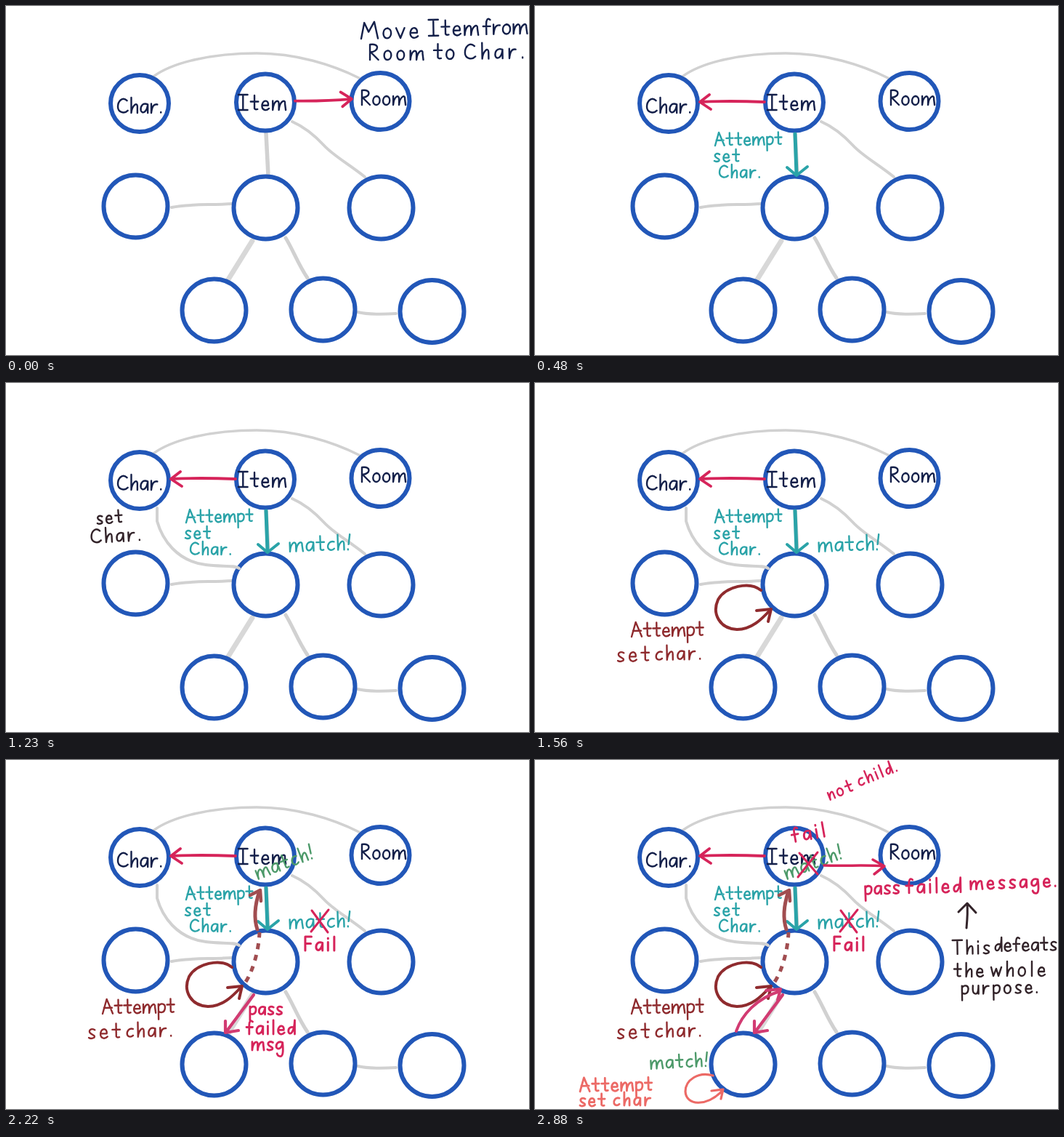
Recreate the animation shown at these times as an HTML page. Size 720x480 px, loop 3.79 s.

```html
<!DOCTYPE html>
<html lang="en">
<head>
<meta charset="utf-8">
<title>Message passing between nodes</title>
<style>
html, body { margin: 0; width: 100%; height: 100%; overflow: hidden; background: #fff; }
svg { display: block; width: 720px; height: 480px; }
path, ellipse { fill: none; stroke-linecap: round; stroke-linejoin: round; vector-effect: non-scaling-stroke; }
</style>
</head>
<body>
<svg id="stage" viewBox="0 0 720 480"></svg>
<script>
const LOOP = 3790, STEP = 80;
const NAVY = '#14204a', BLUE = '#2257b8', GRAY = '#d1d1d1', TEAL = '#2aa3a8', RED = '#d6245a',
      BROWN = '#8f2b2e', ROSE = '#a14d50', PINK = '#d23b72', GREEN = '#4d9a6a', DARK = '#33242a', CORAL = '#ec6a66';

// Pen strokes for each letter: width, path (cap top 0, baseline 20).
const pen = {
  a: [10, 'M10 9C3 6 0 12 1 17C3 22 9 19 10 9V20'],
  c: [9, 'M9 9C3 7 0 13 1 17C3 21 7 20 9 18'],
  d: [10, 'M10 11C4 8 0 12 1 17C3 22 9 19 10 0V20'],
  e: [10, 'M1 14H9C10 7 3 6 1 13C0 20 6 22 10 18'],
  f: [9, 'M9 2C6 -1 4 2 4 7V20M0 10H9'],
  g: [11, 'M10 9C3 6 0 12 1 16C3 20 9 18 10 9C11 20 11 29 7 29Q3 29 2 25'],
  h: [9, 'M1 0V20C2 10 9 5 9 12V20'],
  i: [3, 'M2 8V20M2 2V3'],
  l: [3, 'M2 0V20'],
  m: [18, 'M1 8V20C2 8 9 5 9 12V20C10 8 18 5 17 12L18 20'],
  n: [9, 'M1 8V20C2 10 9 5 9 12V20'],
  o: [10, 'M6 8C-1 8 -1 20 5 20S12 8 5 8'],
  p: [10, 'M1 8V29M1 11C4 6 11 7 10 14C9 21 3 20 1 18'],
  r: [9, 'M1 8V20C2 12 4 8 9 9'],
  s: [9, 'M9 9C4 6 0 10 3 13S10 16 8 19Q4 21 1 19'],
  t: [10, 'M5 1V18Q6 20 9 19M0 9H10'],
  u: [9, 'M1 8C0 18 2 20 5 20S9 14 9 8V20'],
  v: [10, 'M0 8L5 20L10 8'],
  w: [14, 'M0 8L3 20L7 10L10 20L14 8'],
  A: [14, 'M0 20L6 0L14 20M2 12H13'],
  C: [13, 'M12 4C6 -2 0 5 0 12S8 22 13 17'],
  F: [10, 'M1 20V0H10M1 10H9'],
  I: [12, 'M0 0H12M6 0V20M0 20H12'],
  M: [20, 'M0 20L4 1L9 12L16 0L20 20'],
  R: [12, 'M1 20V0C14 -2 13 9 2 10L12 20'],
  T: [14, 'M0 0H14M7 0V20'],
  '.': [2, 'M1 19V19.6'],
  '!': [4, 'M4 0L2 13M1 19.4V20']
};

const stage = document.getElementById('stage');
const layers = [];
let layer;

function add(parent, tag, attrs) {
  const el = document.createElementNS('http://www.w3.org/2000/svg', tag);
  for (const k in attrs) el.setAttribute(k, attrs[k]);
  return parent.appendChild(el);
}
function show(from, to = LOOP) {
  layer = add(stage, 'g', {});
  layers.push({ el: layer, from, to });
}
const line = (d, stroke, width = 4, extra) =>
  add(layer, 'path', { d, stroke, 'stroke-width': width, ...extra });

function write(word, x, y, size, gap, color, turn = 0, width = 2.4) {
  const g = add(layer, 'g', {
    role: 'img', 'aria-label': word,
    transform: `translate(${x} ${y}) rotate(${turn}) scale(${size})`
  });
  let left = 0;
  for (const ch of word) {
    const [w, d] = pen[ch];
    add(g, 'path', { d, stroke: color, 'stroke-width': width, transform: `translate(${left} -20)` });
    left += w + gap;
  }
}
const node = (cx, cy, rx, ry) =>
  add(layer, 'ellipse', { cx, cy, rx, ry, stroke: BLUE, 'stroke-width': 6 });

// The graph
show(0);
line('M203 97C230 77 285 65 345 65C400 65 450 81 486 99', GRAY, 3.5);
line('M358 175L361 233', GRAY, 5.5);
line('M394 159C410 166 425 178 438 192S470 216 494 235', GRAY);
line('M228 277C250 272 280 274 311 272', GRAY);
line('M339 323L306 376', '#d8d8d8', 7);
line('M385 319C395 335 402 355 415 374', GRAY, 5);
line('M484 421C500 425 520 424 537 423', GRAY);
for (const [x, y] of [[184, 134], [357, 132.5], [515.5, 131]]) node(x, y, 40, 39);
for (const [x, y] of [[178.5, 275.5], [357.5, 277.5], [516.5, 277.5], [286.5, 418.5], [436.5, 417.5], [586.5, 420]])
  node(x, y, 44, 43);
write('Char.', 154, 147, 1.05, 3.6, NAVY);
write('Item', 320, 143, 1.05, 4, NAVY);
write('Room', 489, 136, 1, 3.7, NAVY);
const arrow = line('', RED, 3.8);

show(0, 480);
write('Move', 489, 45, 1.15, 6, NAVY, -1);
write('Item', 582, 41, 1.1, 4, NAVY, -1);
write('from', 657, 39, 1.1, 3, NAVY, -1);
write('Room', 500, 74, 1.05, 7, NAVY);
write('to', 589, 73, 1.1, 5, NAVY);
write('Char.', 632, 73, 1.1, 7.5, NAVY, -1);

show(480);
line('M358 176L360 231', TEAL, 5);
line('M347 222L360 233L375 221', TEAL);
write('Attempt', 248, 192, 0.9, 3.3, TEAL, -1);
write('set', 246, 214, 0.9, 5, TEAL);
write('Char.', 254, 236, 0.9, 4.7, TEAL);

show(900);
write('match!', 390, 232, 1.05, 4, TEAL, -2);

show(1230);
line('M208 172V190C215 215 235 245 275 250C295 253 315 250 321 255', GRAY);

show(1230, 1560);
write('set', 125, 194, 0.9, 5, DARK, -4);
write('Char.', 118, 220, 1, 6, DARK, -3);

show(1560);
line('M311 285C295 272 262 280 252 298C243 318 255 338 278 339C298 339 312 325 324 312', BROWN);
line('M305 313L325 311L321 328', BROWN);
write('Attempt', 133, 349, 1, 2.8, BROWN, -1);
write('set', 113, 383, 1.05, 6.5, BROWN, -1);
write('char.', 166, 381, 1, 5.8, BROWN, -1);

show(1890);
line('M346 233C340 215 344 195 349 180', ROSE, 5);
line('M336 186L350 179L351 194', ROSE, 4.5);
line('M330 305C340 290 348 262 349 237', ROSE, 5, { 'stroke-dasharray': '8 8', style: 'stroke-linecap:butt' });
line('M421 207L443 237M444 206L420 236', RED, 3);
write('Fail', 411, 262, 0.95, 6, RED, 0, 3);

show(2220);
line('M341 323L303 374M302 359L302 375L320 372', PINK, 4.2);
write('match!', 347, 164, 1, 4.5, GREEN, -21);

show(2220, 2550);
write('pass', 335, 350, 0.9, 4, RED, 0, 2.8);
write('failed', 331, 377, 0.95, 5, RED, 0, 2.8);
write('msg', 338, 399, 0.95, 4, RED, 0, 2.8);

show(2550);
write('not', 406, 55, 0.85, 6, RED, -22);
write('child.', 447, 36, 0.85, 6, RED, -22);
write('fail', 355, 113, 1, 6.7, RED, -10, 2.8);
line('M364 128L389 157M389 127L362 161', RED, 3);
line('M398 145C430 146 455 144 480 146M465 137L481 146L467 157', RED, 3.5);
write('pass', 454, 185, 0.95, 3.9, RED, -2, 2.8);
write('failed', 511, 183, 1, 6, RED, -1, 2.8);
write('message.', 599, 178, 0.95, 6.5, RED, -2, 2.8);
line('M594 231C595 220 596 210 595 198M583 209L595 197L607 210', DARK, 3);
write('This', 575, 267, 0.95, 6, DARK, -1);
write('defeats', 633, 263, 0.95, 3.5, DARK, -1);
write('the', 577, 298, 0.95, 6.5, DARK);
write('whole', 628, 297, 1, 7, DARK);
write('purpose.', 587, 322, 0.95, 5.9, DARK, -1);
line('M277 373C285 350 305 328 337 318M318 317L338 315L334 330', PINK);
write('match!', 159, 425, 0.95, 4.6, GREEN, -3);

show(2880);
write('Attempt', 62, 456, 0.95, 3.7, CORAL, -1, 2.8);
write('set', 61, 476, 0.9, 5, CORAL, 0, 2.8);
write('char', 108, 475, 0.9, 6.5, CORAL, 0, 2.8);
line('M245 434C225 428 207 440 207 456C208 475 235 478 258 455M243 455L259 453L256 466', CORAL, 3.2);

// Swing of the red arrow round the Item node: angle, reach
const swing = [[2, 119], [40, 118], [84, 122], [116, 106], [140, 114], [160, 122], [180, 130]];

const start = performance.now();
function draw() {
  const t = (performance.now() - start) % LOOP;
  for (const { el, from, to } of layers)
    el.style.display = t >= from && t < to ? '' : 'none';
  const [angle, r] = swing[Math.min(6, Math.floor(t / STEP))];
  arrow.setAttribute('d', `M41 0Q${r * 0.7} 2 ${r} 0M${r - 15} -10L${r} 0L${r - 13} 10`);
  arrow.setAttribute('transform', `translate(357 132) rotate(${-angle})`);
  requestAnimationFrame(draw);
}
draw();
</script>
</body>
</html>
```
